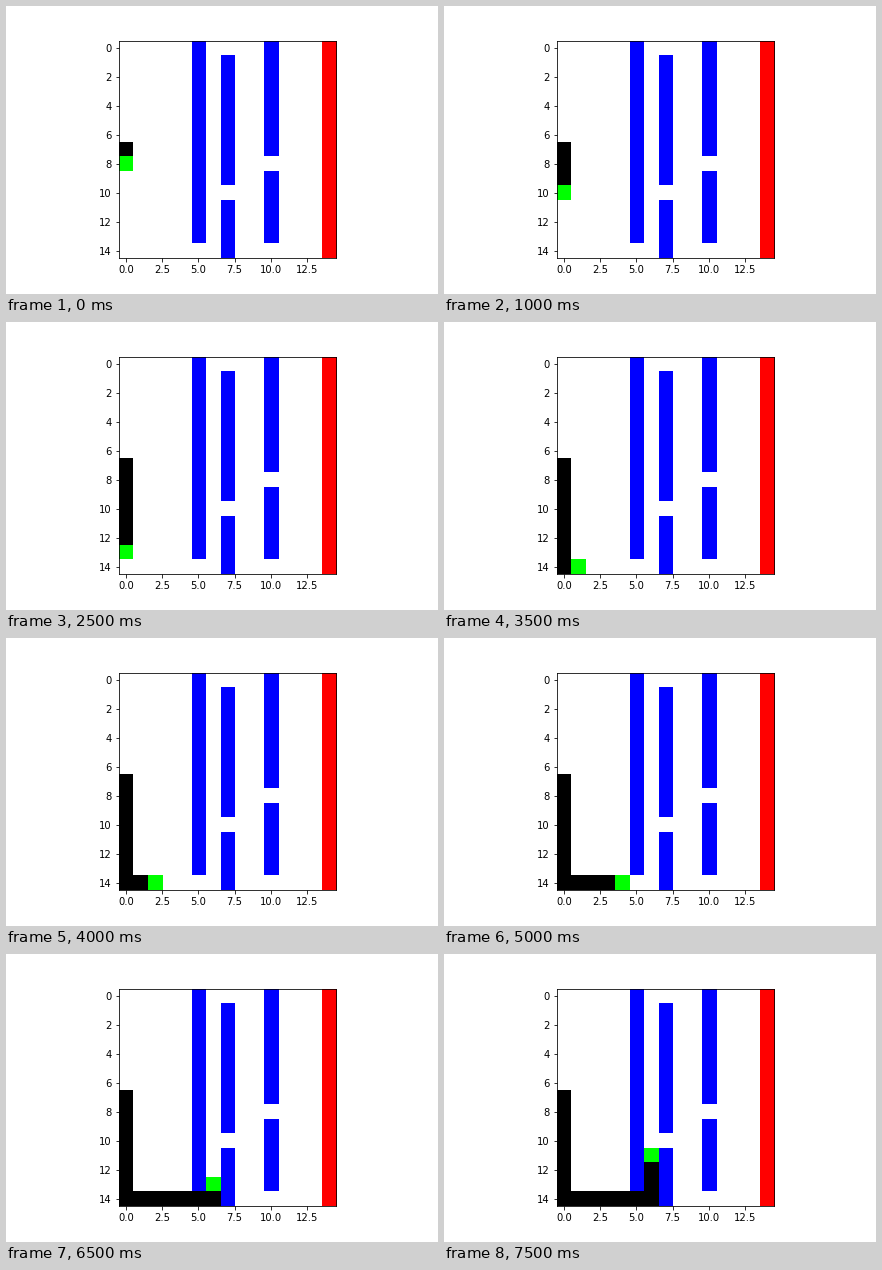
A matplotlib script that plays this animation: 432 px wide and 288 px high, repeating every 8 s.

```python
import numpy as np
import matplotlib.pyplot as plt
from matplotlib.animation import FuncAnimation

SIZE = 15
FRAMES = 16
STEP_MS = 500

BLACK, GREEN = (0, 0, 0), (0, 255, 0)
BLUE, RED, WHITE = (0, 0, 255), (255, 0, 0), (255, 255, 255)

# (column, first row, last row)
WALLS = [(5, 0, 13), (7, 1, 9), (7, 11, 14), (10, 0, 7), (10, 9, 13)]

# Down the left edge, along the bottom, then up between the walls
PATH = (
    [(row, 0) for row in range(7, 15)]
    + [(14, col) for col in range(1, 7)]
    + [(row, 6) for row in range(13, 10, -1)]
)


def make_maze():
    grid = np.full((SIZE, SIZE, 3), WHITE, dtype=np.uint8)
    for col, first, last in WALLS:
        grid[first:last + 1, col] = BLUE
    grid[:, SIZE - 1] = RED
    return grid


plt.rcParams.update({"font.family": "DejaVu Sans", "font.size": 10})
fig, ax = plt.subplots(figsize=(6, 4), dpi=72)
fig.subplots_adjust(left=0.125, right=0.9, bottom=0.125, top=0.88)

maze = make_maze()
image = ax.imshow(maze, interpolation="nearest")


def update(step):
    grid = maze.copy()
    for cell in PATH[:step + 1]:
        grid[cell] = BLACK
    grid[PATH[step + 1]] = GREEN
    image.set_data(grid)
    return [image]


anim = FuncAnimation(fig, update, frames=FRAMES, interval=STEP_MS,
                     repeat=True, repeat_delay=0, blit=False)
plt.show()
```
